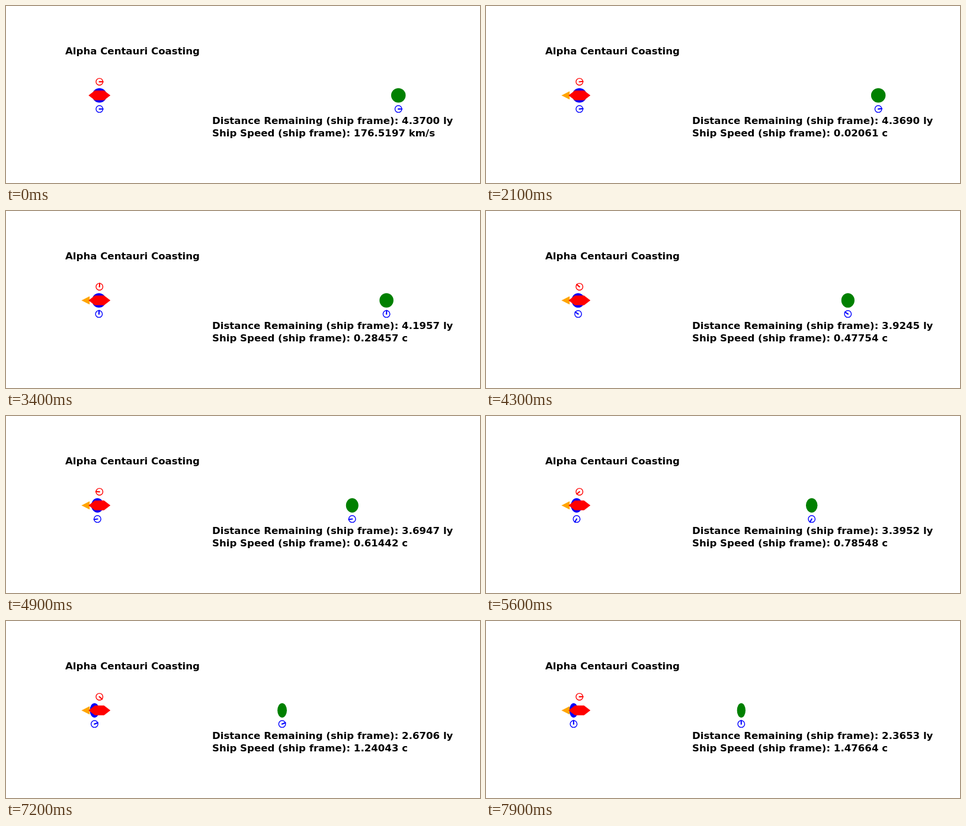
An HTML page with a canvas for the animation above (8000 ms loop, 800 by 300 pixels).

```html
<!DOCTYPE html>
<html lang="en">
<head>
<meta charset="utf-8">
<title>Alpha Centauri Coasting</title>
<style>
  html, body { margin: 0; width: 100%; height: 100%; overflow: hidden; background: #fff; }
  canvas { display: block; }
</style>
</head>
<body>
<canvas id="stage" width="800" height="300"></canvas>
<script>
const ctx = document.getElementById('stage').getContext('2d');

const LOOP = 8000, STEP = 100, HOLD_STEPS = 20;
const HOURS_PER_STEP = 34, CLOCK_PERIOD = 2000;
const C = 299792.458;                 // km/s
const GAIN = 5 * 9.80665 * 3.6 / C;   // rapidity gained per ship hour at 5 g
const HOURS_PER_YEAR = 8766;
const TRIP = 4.37;                    // light years

const EDGE = 1.39, HAND = 2.08;       // line widths
const SCALE = 620 / 5.37;             // pixels per light year
const px = x => 100 + (x + 0.5) * SCALE;
const py = y => 151.5 - y * SCALE;

function polygon(color, points) {
  ctx.fillStyle = ctx.strokeStyle = color;
  ctx.lineWidth = EDGE;
  ctx.beginPath();
  for (const [x, y] of points) ctx.lineTo(px(x), py(y));
  ctx.closePath();
  ctx.fill();
  ctx.stroke();
}

function body(color, x, gamma) {
  ctx.fillStyle = ctx.strokeStyle = color;
  ctx.lineWidth = EDGE;
  ctx.beginPath();
  ctx.ellipse(px(x), py(0), 0.1 * SCALE / gamma, 0.1 * SCALE, 0, 0, 2 * Math.PI);
  ctx.fill();
  ctx.stroke();
}

function clock(color, x, y, hours) {
  const r = 0.05 * SCALE, angle = 2 * Math.PI * hours / CLOCK_PERIOD;
  ctx.strokeStyle = color;
  ctx.lineWidth = EDGE;
  ctx.beginPath();
  ctx.arc(px(x), py(y), r, 0, 2 * Math.PI);
  ctx.stroke();
  ctx.lineWidth = HAND;
  ctx.lineCap = 'square';
  ctx.beginPath();
  ctx.moveTo(px(x), py(y));
  ctx.lineTo(px(x) + r * Math.cos(angle), py(y) - r * Math.sin(angle));
  ctx.stroke();
}

function draw(time) {
  const step = Math.max(0, Math.floor(time % LOOP / STEP) - HOLD_STEPS);
  const shipHours = 1 + HOURS_PER_STEP * step;
  const rapidity = GAIN * shipHours;
  const gamma = Math.cosh(rapidity), speed = Math.sinh(rapidity);
  const earthHours = speed / GAIN;
  const travelled = (gamma - 1) / (GAIN * HOURS_PER_YEAR);
  const earth = -travelled / gamma, star = (TRIP - travelled) / gamma;

  ctx.fillStyle = '#fff';
  ctx.fillRect(0, 0, 800, 300);

  body('blue', earth, gamma);
  body('green', star, gamma);
  if (step) polygon('orange', [[-0.25, 0], [-0.15, 0.05], [-0.15, -0.05]]);
  polygon('red', [[-0.15, 0], [-0.065, 0.066], [0.065, 0.066],
                  [0.15, 0], [0.065, -0.066], [-0.065, -0.066]]);
  clock('red', 0, 0.2, shipHours);
  clock('blue', earth, -0.2, earthHours);
  clock('blue', star, -0.2, earthHours);

  const speedLabel = speed < 0.001 ? (speed * C).toFixed(4) + ' km/s' : speed.toFixed(5) + ' c';
  ctx.fillStyle = '#000';
  ctx.font = 'bold 16.6px "DejaVu Sans", sans-serif';
  ctx.fillText('Alpha Centauri Coasting', 100, 82);
  ctx.fillText(`Distance Remaining (ship frame): ${star.toFixed(4)} ly`, 348, 200);
  ctx.fillText(`Ship Speed (ship frame): ${speedLabel}`, 348, 221);
}

const start = performance.now();
function tick() {
  draw(performance.now() - start);
  requestAnimationFrame(tick);
}
tick();
</script>
</body>
</html>
```
